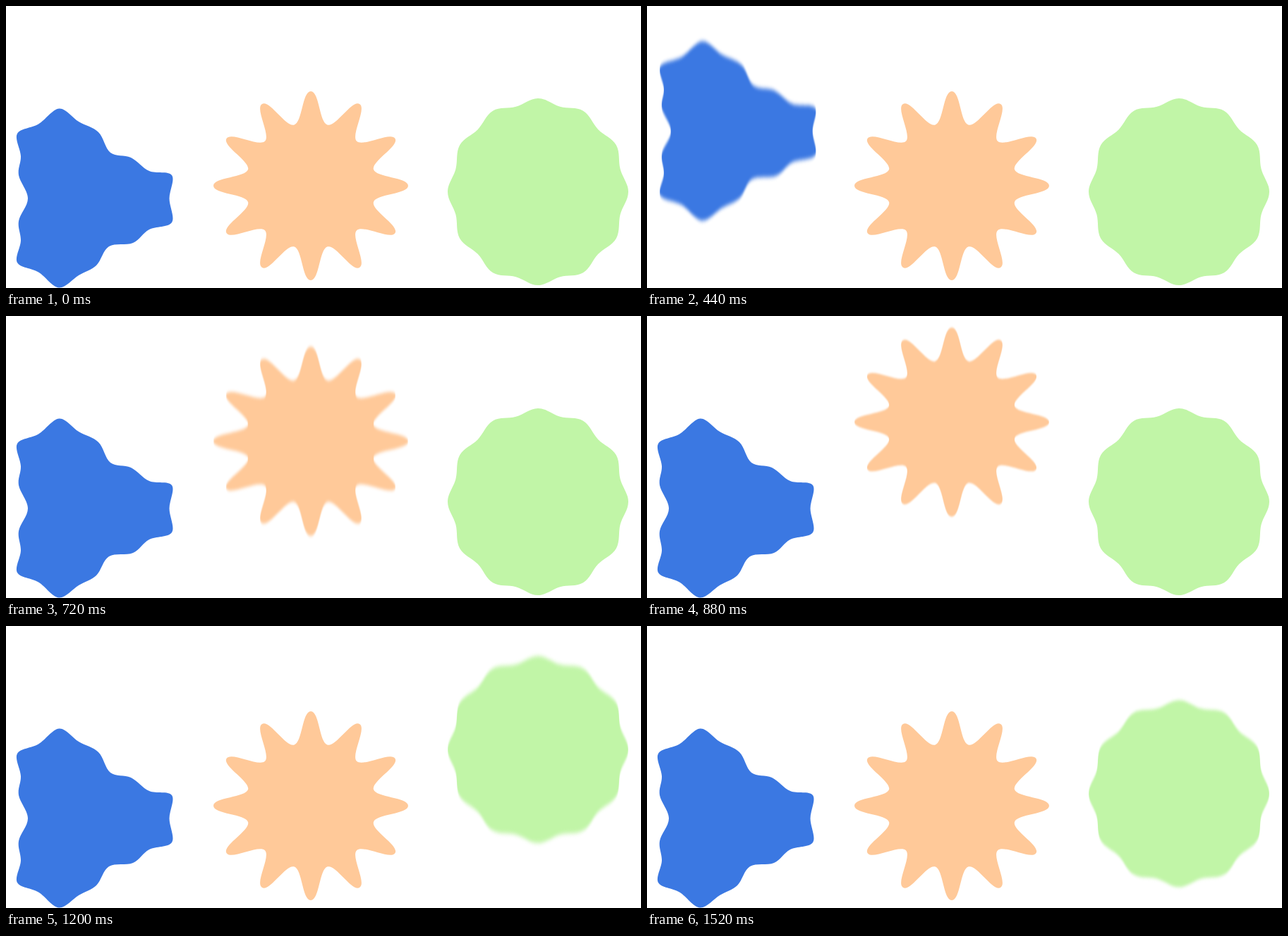
These frames come from a looping animation (900x400 px, 1560 ms). An HTML page:

```html
<!DOCTYPE html>
<html lang="en">
<head>
<meta charset="utf-8">
<title>Jumping shapes</title>
<style>
  html, body { margin: 0; width: 100%; height: 100%; overflow: hidden; background: #fff; }
  svg { display: block; }
</style>
</head>
<body>
<svg width="900" height="400" viewBox="0 0 900 400"></svg>
<script>
const LOOP = 1560, STEP = 40, SHUTTER = 20;
const svg = document.querySelector('svg');

function add(parent, tag, attrs) {
  const el = document.createElementNS('http://www.w3.org/2000/svg', tag);
  for (const key in attrs) el.setAttribute(key, attrs[key]);
  return parent.appendChild(el);
}

const fmt = p => p.map(v => v.toFixed(2)).join(' ');

// Ring of alternating tips and dips, joined by curves that are tangential at both.
function wavyRing(cx, cy, rx, ry, dip, handle, tips = 12) {
  const at = (i, side) => {
    const a = i * Math.PI / tips, r = i % 2 ? dip : 1, h = side * handle;
    return [cx + rx * (r * Math.cos(a) - h * Math.sin(a)),
            cy + ry * (r * Math.sin(a) + h * Math.cos(a))];
  };
  let d = 'M' + fmt(at(0, 0));
  for (let i = 0; i < 2 * tips; i++)
    d += 'C' + [at(i, 1), at(i + 1, -1), at(i + 1, 0)].map(fmt).join(' ');
  return d + 'Z';
}

// Closed smooth curve through the given points.
function smoothLoop(pts) {
  const n = pts.length, pt = i => pts[(i + n) % n];
  const ctrl = (i, side) => pt(i).map((v, k) => v + side * (pt(i + 1)[k] - pt(i - 1)[k]) / 6);
  let d = 'M' + fmt(pt(0));
  for (let i = 0; i < n; i++)
    d += 'C' + [ctrl(i, 1), ctrl(i + 1, -1), pt(i + 1)].map(fmt).join(' ');
  return d + 'Z';
}

const blob = smoothLoop([
  [231.5, 273], [235, 240], [203, 234], [177, 215], [148, 208], [131, 179], [103, 164], [75.5, 145.5],
  [46, 167.5], [16, 181], [21, 213], [18, 240], [31, 273], [18, 305], [21, 333], [16, 364],
  [46, 377.5], [75, 399.5], [103, 382], [128, 368], [146, 341], [180, 336], [203, 317], [235, 307]
]);

const shapes = [
  { fill: '#3b78e2', d: blob, start: 22, rise: 312, height: 130, drift: .032 },
  { fill: '#ffc999', d: wavyRing(432, 255, 138, 134, .667, .09), start: 522, rise: 312, height: 111, drift: 0 },
  { fill: '#c1f5a7', d: wavyRing(754, 263.5, 128, 132.5, .943, .09), start: 996, rise: 308, height: 120, drift: 0 }
];

shapes.forEach((s, i) => {
  const filter = add(svg, 'filter', {
    id: 'blur' + i, filterUnits: 'userSpaceOnUse', x: 0, y: -20, width: 900, height: 460,
    'color-interpolation-filters': 'sRGB'
  });
  s.blur = add(filter, 'feGaussianBlur', { stdDeviation: '0 0' });
  s.group = add(svg, 'g', {});
  add(s.group, 'path', { d: s.d, fill: s.fill });
});

function draw(t) {
  shapes.forEach((s, i) => {
    const phase = (t - s.start) / s.rise;
    const u = Math.max(0, 1 - Math.abs(phase - 1));
    const lift = s.height * u * u * (3 - 2 * u);
    const speed = s.height * 6 * u * (1 - u) / s.rise;
    const sigma = speed * SHUTTER / Math.sqrt(12);
    s.group.firstChild.setAttribute('transform', `translate(${lift * s.drift} ${-lift})`);
    if (sigma > .2) {
      s.blur.setAttribute('stdDeviation', '0 ' + sigma.toFixed(2));
      s.group.setAttribute('filter', `url(#blur${i})`);
    } else {
      s.group.removeAttribute('filter');
    }
  });
}

const begin = performance.now();
function tick() {
  const t = (performance.now() - begin) % LOOP;
  draw(Math.floor(t / STEP) * STEP);
  requestAnimationFrame(tick);
}
tick();
</script>
</body>
</html>
```
